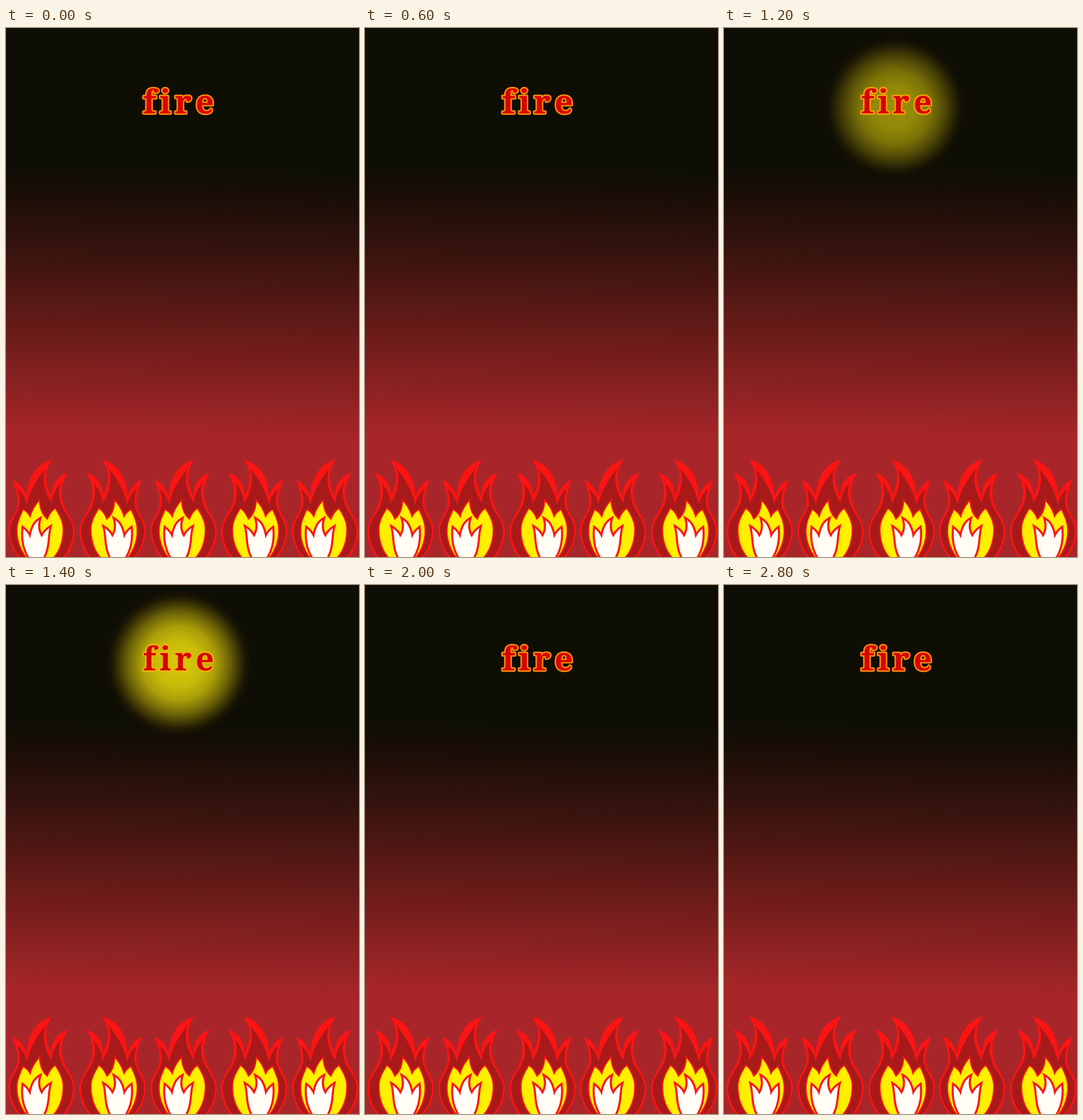
These frames come from a looping animation (611 px wide and 917 px high, 3 s). An HTML page without scripts:

```html
<!DOCTYPE html>
<html lang="en">
<head>
<meta charset="utf-8">
<title>fire</title>
<style>
  html, body { margin: 0; width: 100%; height: 100%; overflow: hidden; background: #0f0e05; }
  svg { display: block; width: 100vw; height: 100vh; }

  .flame { animation: flip 3s step-end infinite; }
  .glow { animation: glow 3s step-end infinite; }
  .word {
    font: 700 56px "Noto Serif", serif;
    fill: #d60303;
    stroke: #ff8c0a;
    stroke-width: 5px;
    stroke-linejoin: round;
    paint-order: stroke;
    animation: edge 3s step-end infinite;
  }
  .core { stroke: #fb1414; paint-order: stroke; }

  /* one beat is 200 ms; the flicker rests for a beat as the glow starts */
  @keyframes flip {
    0%, 13.33%, 26.66%, 46.66%, 60%, 73.33%, 86.66%, 100% { transform: matrix(1, 0, 0, 1, 0, 0); }
    6.66%, 20%, 40%, 53.33%, 66.66%, 80%, 93.33% { transform: matrix(-1, 0, 0, 1, 123, 0); }
  }
  @keyframes glow {
    0%, 66.66%, 100% { opacity: 0; transform: translate(294px, 139px) scale(.95); }
    33.33%, 60% { opacity: .36; transform: translate(294px, 139px) scale(.95); }
    40%, 53.33% { opacity: .6; transform: translate(296px, 138px) scale(.97); }
    46.66% { opacity: .86; transform: translate(299px, 136px) scale(1); }
  }
  @keyframes edge {
    0%, 33.33%, 60%, 100% { stroke: #ff8c0a; }
    40%, 53.33% { stroke: #fa9e0a; }
    46.66% { stroke: #eeb60a; }
  }
</style>
</head>
<body>
<svg viewBox="0 0 611 917" preserveAspectRatio="none">
  <defs>
    <linearGradient id="sky" gradientUnits="userSpaceOnUse" x1="306" y1="248" x2="295" y2="708">
      <stop offset="0" stop-color="#0f0e05"/>
      <stop offset=".1" stop-color="#1b0e07"/>
      <stop offset=".3" stop-color="#36130e"/>
      <stop offset=".6" stop-color="#661b18"/>
      <stop offset="1" stop-color="#a82629"/>
    </linearGradient>
    <radialGradient id="light">
      <stop offset="0" stop-color="#f8ea0c"/>
      <stop offset=".3" stop-color="#f4e40c" stop-opacity=".95"/>
      <stop offset=".5" stop-color="#f0de0c" stop-opacity=".81"/>
      <stop offset=".7" stop-color="#ecd80c" stop-opacity=".48"/>
      <stop offset=".82" stop-color="#e4c80a" stop-opacity=".24"/>
      <stop offset=".92" stop-color="#c89008" stop-opacity=".07"/>
      <stop offset="1" stop-color="#a06008" stop-opacity="0"/>
    </radialGradient>

    <g id="flame">
      <path fill="#fb1414" d="M22 918C9 902 4 886 4 869C5 848 20 842 20 820C20 806 14 796 12 783
        C23 788 32 799 36 812C37 778 54 754 80 748C66 766 67 788 78 811C79 790 89 776 107 771
        C98 785 95 800 97 813C99 836 118 848 119 872C118 892 113 905 102 918Z"/>
      <path fill="#a81a1a" d="M26 918C13 904 7 888 7 870C8 851 23 842 24 821C24 812 22 806 20 799
        C28 805 33 814 36 826C42 801 52 784 68 764C61 785 68 806 79 824C80 811 84 801 94 789
        C90 803 92 815 95 824C100 841 115 851 116 872C115 891 109 905 98 918Z"/>
      <path class="core" fill="#ffef00" stroke-width="4.4" d="M37 919C25 904 19 886 20 868
        C21 854 26 846 30 836C35 839 39 843 42 850C45 838 50 829 57 821C58 836 63 846 72 853
        C75 845 79 838 85 834C91 844 98 855 98 869C98 889 92 907 80 919Z"/>
      <path class="core" fill="#fffdf5" stroke-width="7" d="M42 920C33 907 28 890 30 868
        C35 872 39 877 42 885C44 869 49 858 57 853C54 864 56 874 62 883C65 876 69 871 75 867
        C71 884 74 902 63 920Z"/>
    </g>
  </defs>

  <rect width="611" height="917" fill="url(#sky)"/>
  <circle class="glow" r="128" fill="url(#light)"/>
  <text class="word" x="237 266 292 328" y="148">fire</text>

  <!-- every second flame starts mirrored -->
  <g><use class="flame" href="#flame"/></g>
  <g transform="matrix(-1 0 0 1 246 0)"><use class="flame" href="#flame"/></g>
  <g transform="translate(246 0)"><use class="flame" href="#flame"/></g>
  <g transform="matrix(-1 0 0 1 491 0)"><use class="flame" href="#flame"/></g>
  <g transform="translate(491 0)"><use class="flame" href="#flame"/></g>
</svg>
</body>
</html>
```
